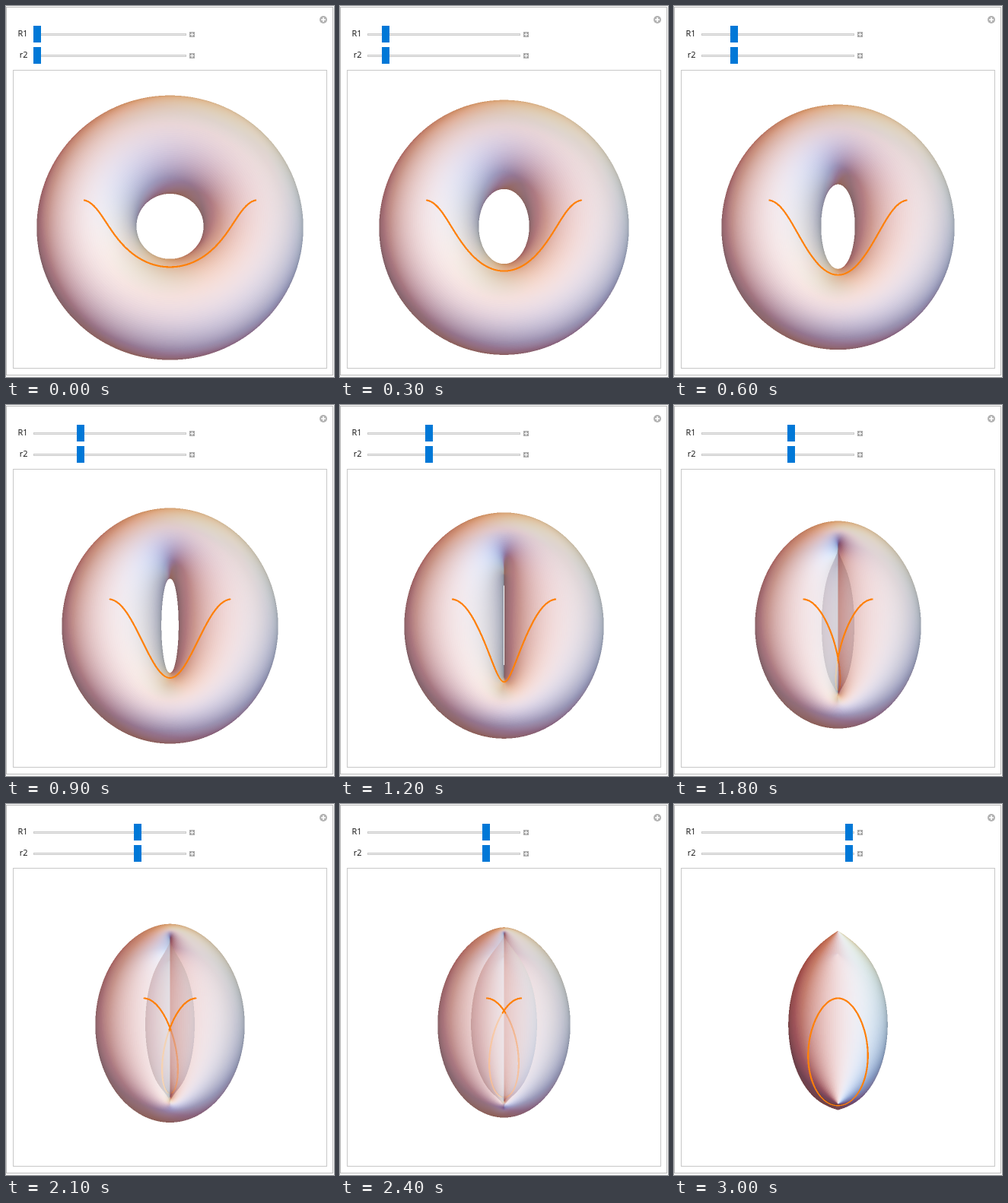
Write an HTML page with a canvas that moves like this. It is 431 px wide and 488 px high and loops after 4000 ms.

```html
<!DOCTYPE html>
<html lang="en">
<head>
<meta charset="utf-8">
<title>Torus with two radii</title>
<style>
html, body { margin: 0; width: 100%; height: 100%; overflow: hidden; background: #fff; }
canvas, svg { position: absolute; display: block; }
canvas { left: 34px; top: 108px; }
svg { left: 0; top: 0; }
text { font: 11px "Open Sans", "Noto Sans", sans-serif; fill: #111; text-anchor: end; }
</style>
</head>
<body>
<canvas id="view" width="364" height="364"></canvas>
<svg width="431" height="488" viewBox="0 0 431 488">
  <defs>
    <g id="slider">
      <rect x="36.5" y="36.5" width="200" height="2" fill="#ececec" stroke="#cbcbcb"/>
      <rect x="241" y="34" width="7" height="7" fill="#aaa"/>
      <path d="M242 37.5h5M244.5 35v5" stroke="#fff"/>
    </g>
  </defs>
  <rect x=".5" y="1.5" width="429" height="484" fill="none" stroke="#b9b9b9"/>
  <rect x="9.5" y="84.5" width="412" height="392" fill="none" stroke="#c8c8c8"/>
  <circle cx="417" cy="18" r="5" fill="#b2b2b2"/>
  <path d="M414 18h6M417 15v6" stroke="#fff" stroke-width="1.6"/>
  <text x="28.5" y="40">R1</text>
  <text x="28.5" y="68">r2</text>
  <use href="#slider"/>
  <use href="#slider" y="28"/>
  <g id="thumbs" fill="#0078d7">
    <rect x="36" y="26" width="10" height="22"/>
    <rect x="36" y="54" width="10" height="22"/>
  </g>
</svg>
<script>
const STEP = 300, LOOP = 4000, LAST = 10;
const SIZE = 364, SS = 2, N = SIZE * SS, DEEP = 8;
const NU = 360, NV = 160;
const RING = 109.3, TUBE = 65.2, ALPHA = 0.7;
const CX = 181.5, CY = 181.3, DIST = 1230;
const TILT = 8.5 * Math.PI / 180, COS = Math.cos(TILT), SIN = Math.sin(TILT);
const LINE = [255, 128, 8], LINE_RADIUS = 1.1 * SS;

const AMBIENT = [0.4, 0.2, 0.2];
const LIGHTS = [
  [[2, 0, 2], [0, 0.18, 0.5]],
  [[2, 2, 3], [0.18, 0.5, 0.18]],
  [[0, 2, 2], [0.5, 0.18, 0]],
  [[0, 0, 2], [0, 0, 0.18]]
].map(([d, color]) => [d.map(c => c / Math.hypot(...d)), color]);

const depth = new Float32Array(N * N * DEEP);
const tint = new Uint32Array(N * N * DEEP);
const count = new Uint8Array(N * N);
const lineDepth = new Float32Array(N * N);

const toCamera = (x, y, z) => [x, y * COS + z * SIN, z * COS - y * SIN];

function makeSurface(k) {
  const R1 = RING * (1 - k / LAST), r2 = TUBE * (1 - k / LAST);
  const at = (u, v) => toCamera(
    (R1 + TUBE * Math.cos(v)) * Math.cos(u),
    (RING + r2 * Math.cos(v)) * Math.sin(u),
    TUBE * Math.sin(v));
  const normal = (u, v) => {
    const cu = Math.cos(u), su = Math.sin(u), cv = Math.cos(v), sv = Math.sin(v);
    const ax = -(R1 + TUBE * cv) * su, ay = (RING + r2 * cv) * cu;
    const bx = -TUBE * sv * cu, by = -r2 * sv * su, bz = TUBE * cv;
    return toCamera(ay * bz, -ax * bz, ax * by - ay * bx);
  };
  return { at, normal };
}

function project([x, y, w]) {
  const m = DIST / (DIST - w);
  return [(CX + x * m) * SS, (CY - y * m) * SS, w];
}

// Lit colour of a patch, with its normal turned towards the viewer.
function shade(p, n) {
  const facing = n[2] * (DIST - p[2]) - n[0] * p[0] - n[1] * p[1];
  const scale = (facing < 0 ? -1 : 1) / (Math.hypot(n[0], n[1], n[2]) || 1);
  let [r, g, b] = AMBIENT;
  for (const [d, c] of LIGHTS) {
    const dot = (d[0] * n[0] + d[1] * n[1] + d[2] * n[2]) * scale;
    if (dot <= 0) continue;
    r += c[0] * dot;
    g += c[1] * dot;
    b += c[2] * dot;
  }
  const byte = c => Math.min(255, Math.round(c * 255));
  return byte(r) << 16 | byte(g) << 8 | byte(b);
}

// Keeps the layers of a sample sorted, nearest first.
function addLayer(p, d, color) {
  if (count[p] === DEEP) return;
  const first = p * DEEP;
  let i = first + count[p]++;
  for (; i > first && depth[i - 1] < d; i--) {
    depth[i] = depth[i - 1];
    tint[i] = tint[i - 1];
  }
  depth[i] = d;
  tint[i] = color;
}

const edgeX = (p, q, y) => p[0] + (y - p[1]) * (q[0] - p[0]) / (q[1] - p[1]);

function fillTriangle(a, b, c, color) {
  let t;
  if (b[1] < a[1]) { t = a; a = b; b = t; }
  if (c[1] < a[1]) { t = a; a = c; c = t; }
  if (c[1] < b[1]) { t = b; b = c; c = t; }
  const y0 = Math.max(0, Math.ceil(a[1] - 0.5));
  const y1 = Math.min(N, Math.ceil(c[1] - 0.5));
  if (y0 >= y1) return;
  const bx = b[0] - a[0], by = b[1] - a[1], bd = b[2] - a[2];
  const cx = c[0] - a[0], cy = c[1] - a[1], cd = c[2] - a[2];
  const det = bx * cy - cx * by;
  const flat = Math.abs(det) < 1e-4;
  const dx = flat ? 0 : (bd * cy - cd * by) / det;
  const dy = flat ? 0 : (bx * cd - cx * bd) / det;
  for (let y = y0; y < y1; y++) {
    const yc = y + 0.5;
    const e = edgeX(a, c, yc);
    const f = yc < b[1] ? edgeX(a, b, yc) : edgeX(b, c, yc);
    const x0 = Math.max(0, Math.ceil(Math.min(e, f) - 0.5));
    const x1 = Math.min(N, Math.ceil(Math.max(e, f) - 0.5));
    for (let x = x0; x < x1; x++) {
      addLayer(y * N + x, a[2] + (x + 0.5 - a[0]) * dx + (yc - a[1]) * dy, color);
    }
  }
}

function drawSurface({ at, normal }) {
  const du = 2 * Math.PI / NU, dv = 2 * Math.PI / NV;
  const grid = [];
  for (let i = 0; i < NU; i++) {
    for (let j = 0; j < NV; j++) grid.push(project(at(i * du, j * dv)));
  }
  for (let i = 0; i < NU; i++) {
    const row = i * NV, next = (i + 1) % NU * NV;
    for (let j = 0; j < NV; j++) {
      const k = (j + 1) % NV, u = (i + 0.5) * du, v = (j + 0.5) * dv;
      const color = shade(at(u, v), normal(u, v));
      const a = grid[row + j], c = grid[next + k];
      fillTriangle(a, grid[next + j], c, color);
      fillTriangle(a, c, grid[row + k], color);
    }
  }
}

// The line is half an ellipse in the (u, v) plane.
function drawLine({ at }) {
  const dots = 1000;
  for (let i = 0; i <= dots; i++) {
    const t = Math.PI * i / dots;
    const [px, py, w] = project(at(-Math.PI / 2 + 1.78 * Math.cos(t), Math.PI / 2 + 0.89 * Math.sin(t)));
    for (let y = Math.floor(py - LINE_RADIUS); y <= py + LINE_RADIUS; y++) {
      for (let x = Math.floor(px - LINE_RADIUS); x <= px + LINE_RADIUS; x++) {
        if (Math.hypot(x + 0.5 - px, y + 0.5 - py) > LINE_RADIUS) continue;
        const p = y * N + x;
        lineDepth[p] = Math.max(lineDepth[p], w + 1.5);
      }
    }
  }
}

function blend(p, sum) {
  const first = p * DEEP, end = first + count[p];
  let light = 1, i = first;
  for (; i < end && depth[i] >= lineDepth[p]; i++) {
    const c = tint[i], part = light * ALPHA;
    sum[0] += part * (c >> 16);
    sum[1] += part * (c >> 8 & 255);
    sum[2] += part * (c & 255);
    light *= 1 - ALPHA;
  }
  const hasLine = lineDepth[p] > -1e6;
  for (let j = 0; j < 3; j++) sum[j] += light * (hasLine ? LINE[j] : 255);
}

function renderStep(k) {
  count.fill(0);
  lineDepth.fill(-1e9);
  const surface = makeSurface(k);
  drawSurface(surface);
  drawLine(surface);
  const image = new ImageData(SIZE, SIZE);
  const sum = [0, 0, 0];
  for (let y = 0, o = 0; y < SIZE; y++) {
    for (let x = 0; x < SIZE; x++, o += 4) {
      sum.fill(0);
      for (let s = 0; s < SS * SS; s++) {
        blend((y * SS + (s / SS | 0)) * N + x * SS + s % SS, sum);
      }
      for (let j = 0; j < 3; j++) image.data[o + j] = sum[j] / (SS * SS);
      image.data[o + 3] = 255;
    }
  }
  return image;
}

const view = document.getElementById("view").getContext("2d");
const thumbs = document.getElementById("thumbs");
const images = [];
const imageFor = k => images[k] || (images[k] = renderStep(k));
const start = performance.now();
let shown = -1;

function update() {
  const t = (performance.now() - start) % LOOP;
  const k = Math.min(LAST, Math.floor(t / STEP));
  if (k !== shown) {
    view.putImageData(imageFor(k), 0, 0);
    thumbs.setAttribute("transform", `translate(${Math.round(18.9 * k)} 0)`);
    shown = k;
  } else if (k < LAST) {
    imageFor(k + 1); // prepare the next pose ahead of time
  }
  requestAnimationFrame(update);
}
update();
</script>
</body>
</html>
```
